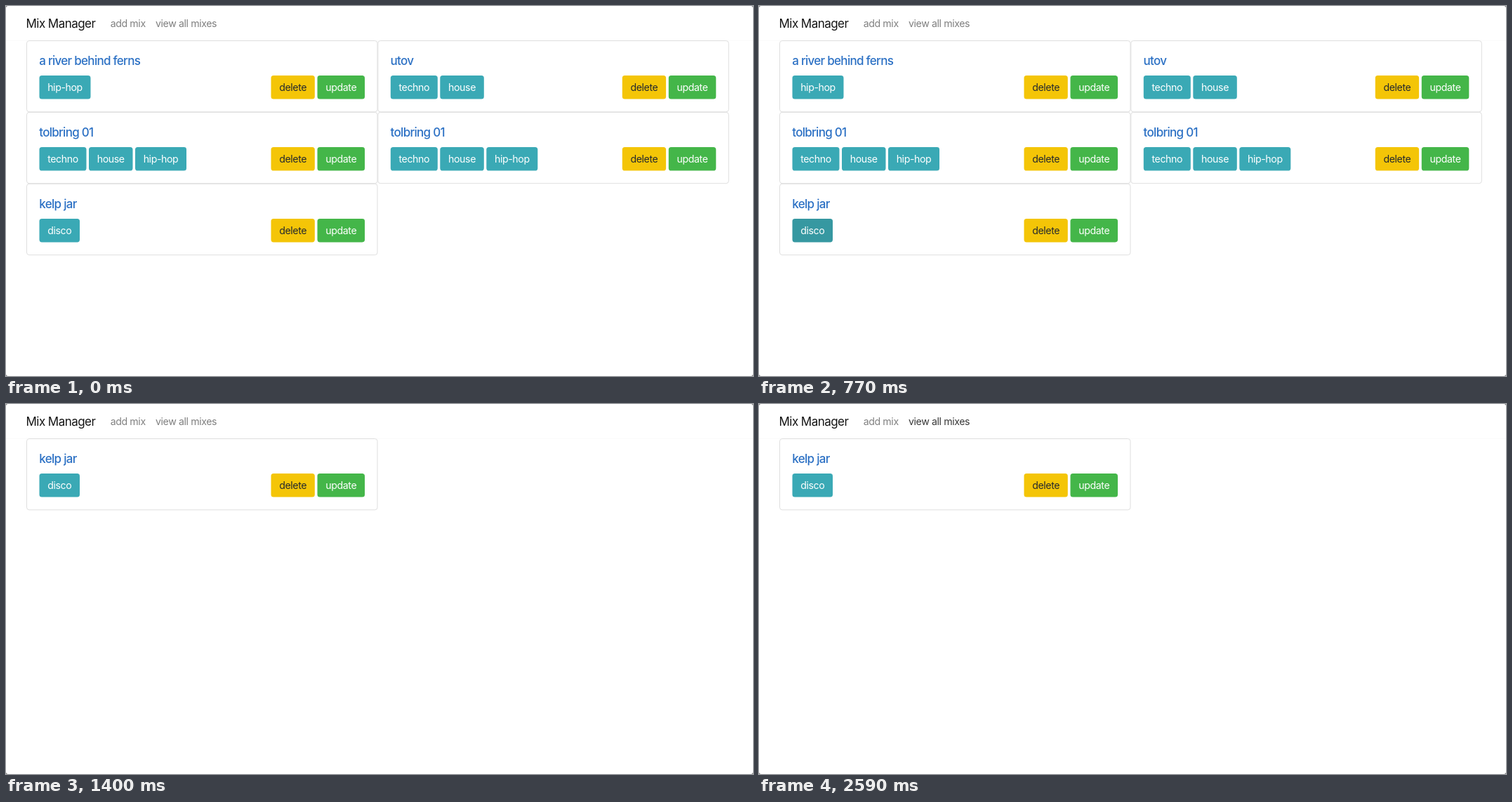
These frames come from a looping animation (1064 px wide and 527 px high, 2.8 s). An HTML page:

```html
<!DOCTYPE html>
<html lang="en">
<head>
<meta charset="utf-8">
<title>Mix Manager</title>
<style>
  html, body { margin: 0; width: 100%; height: 100%; overflow: hidden; background: #fff; }
  svg { display: block; width: 1064px; height: 527px; }
  text { font: 14.16px Inter, "Open Sans", sans-serif; letter-spacing: -.028em; }
  .brand { font-size: 17px; letter-spacing: -.032em; fill: #151515; }
  .link { fill: #7f7f7f; }
  .title { font-size: 17px; font-weight: 500; letter-spacing: -.042em; fill: #2b70c4; }
  .label { text-anchor: middle; }
  .card { fill: #fff; stroke: #dfdfdf; }
</style>
</head>
<body>
<svg id="stage" viewBox="0 0 1064 527"></svg>
<script>
const LOOP = 2800, HOVER_TAG = 690, PRESS_TAG = 1190, FILTER = 1400, HOVER_LINK = 2450, FADE = 150;
const TEAL = [58, 169, 181], TEAL_HOVER = [51, 139, 146], TEAL_PRESSED = [46, 131, 138];
const YELLOW = '#f4c507', GREEN = '#44b649';
const TAG_WIDTH = { 'hip-hop': 73, techno: 67, house: 62.5, disco: 57.5 };
const rgb = color => `rgb(${color.map(Math.round)})`;

function add(parent, name, attributes = {}, content = '') {
  const node = document.createElementNS('http://www.w3.org/2000/svg', name);
  for (const key in attributes) node.setAttribute(key, attributes[key]);
  node.textContent = content;
  return parent.appendChild(node);
}

function button(parent, x, y, width, label, fill, ink = '#fff') {
  const box = add(parent, 'rect', { x, y, width, height: 33.5, rx: 3.6, fill });
  add(parent, 'text', { class: 'label', x: x + width / 2, y: y + 22, fill: ink }, label);
  return box;
}

// Returns the card's last tag.
function card(parent, column, row, title, tags) {
  const group = add(parent, 'g', { transform: `translate(${29.5 + column * 500.3} ${49.5 + row * 101.9})` });
  add(group, 'rect', { class: 'card', width: 499.5, height: 101.3, rx: 3.6 });
  add(group, 'text', { class: 'title', x: 17.8, y: 34.7 }, title);
  let x = 18, tag;
  for (const label of tags) {
    tag = button(group, x, 49.6, TAG_WIDTH[label], label, rgb(TEAL));
    x += TAG_WIDTH[label] + 3.5;
  }
  button(group, 348, 49.6, 62.3, 'delete', YELLOW, '#24292e');
  button(group, 414, 49.6, 67.5, 'update', GREEN);
  return tag;
}

const stage = document.getElementById('stage');
add(stage, 'path', { d: 'M0 49H1064', stroke: '#fafafa' });
add(stage, 'text', { class: 'brand', x: 28.5, y: 31 }, 'Mix Manager');
add(stage, 'text', { class: 'link', x: 148.7, y: 30 }, 'add mix');
const viewAll = add(stage, 'text', { class: 'link', x: 213, y: 30 }, 'view all mixes');

const allMixes = add(stage, 'g'), filtered = add(stage, 'g');
card(allMixes, 0, 0, 'a river behind ferns', ['hip-hop']);
card(allMixes, 1, 0, 'utov', ['techno', 'house']);
card(allMixes, 0, 1, 'tolbring 01', ['techno', 'house', 'hip-hop']);
card(allMixes, 1, 1, 'tolbring 01', ['techno', 'house', 'hip-hop']);
const discoTag = card(allMixes, 0, 2, 'kelp jar', ['disco']);
card(filtered, 0, 0, 'kelp jar', ['disco']);

// Rounded window corners
add(stage, 'path', {
  d: 'M0 0H1064V527H0ZM3 0Q0 0 0 3V524Q0 527 3 527H1061Q1064 527 1064 524V3Q1064 0 1061 0Z',
  fill: '#6b6b6b', 'fill-rule': 'evenodd'
});

function fade(time, start) {
  const p = Math.min(1, Math.max(0, (time - start) / FADE));
  return p * p * (3 - 2 * p);
}
const mix = (from, to, p) => from.map((value, i) => value + (to[i] - value) * p);

function draw(now) {
  const time = now % LOOP;
  const hovered = mix(TEAL, TEAL_HOVER, fade(time, HOVER_TAG));
  discoTag.setAttribute('fill', rgb(mix(hovered, TEAL_PRESSED, fade(time, PRESS_TAG))));
  allMixes.style.display = time < FILTER ? '' : 'none';
  filtered.style.display = time < FILTER ? 'none' : '';
  viewAll.style.fill = time < HOVER_LINK ? '' : '#383838';
}

const start = performance.now();
function tick() {
  draw(performance.now() - start);
  requestAnimationFrame(tick);
}
tick();
</script>
</body>
</html>
```
